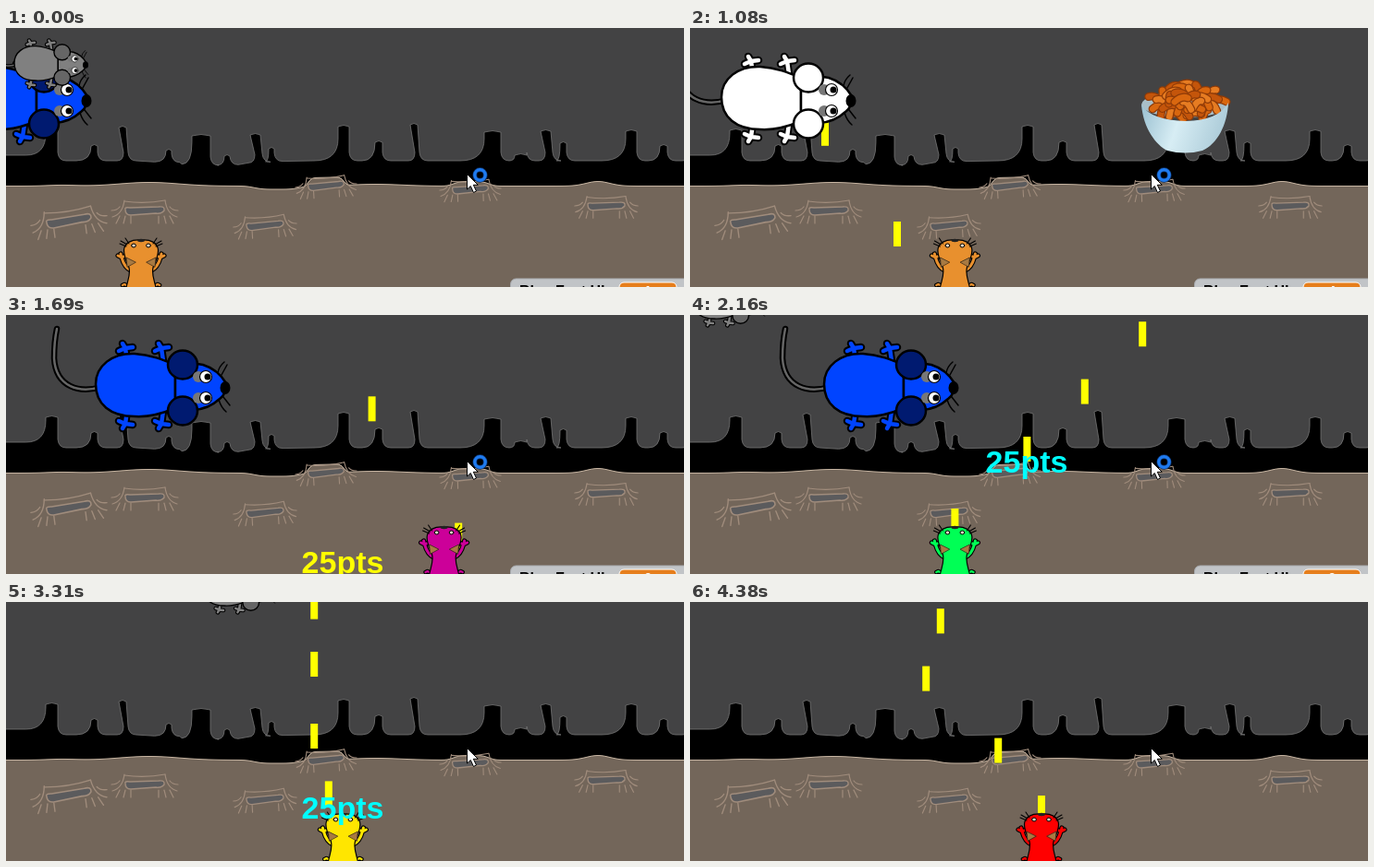
An HTML page with a canvas for the animation above (4460 ms loop, 733 by 281 pixels).

```html
<!DOCTYPE html>
<html lang="en">
<head>
<meta charset="utf-8">
<title>Cave mice</title>
<style>
html, body { margin: 0; width: 100%; height: 100%; overflow: hidden; background: #000; }
canvas { display: block; }
</style>
</head>
<body>
<canvas id="stage" width="733" height="281"></canvas>
<script>
const ctx = document.getElementById('stage').getContext('2d');
const LOOP = 4460, STEPS = 58, UNIT = 15.6, TICKS = 7 / 3;
const FONT = '"Liberation Sans", Arial, sans-serif';

function shape(d, fill, stroke, width = 1) {
  const path = typeof d === 'string' ? new Path2D(d) : d;
  if (fill) { ctx.fillStyle = fill; ctx.fill(path); }
  if (stroke) { ctx.strokeStyle = stroke; ctx.lineWidth = width; ctx.stroke(path); }
}

function oval(x, y, rx, ry, fill, stroke, width) {
  const path = new Path2D();
  path.ellipse(x, y, rx, ry, 0, 0, Math.PI * 2);
  shape(path, fill, stroke, width);
}

function panel(x, y, w, h, r, fill, stroke) {
  const path = new Path2D();
  path.roundRect(x, y, w, h, r);
  shape(path, fill, stroke);
}

function limb(d, color, width, edge = 2) {
  shape(d, null, '#000', width + edge * 2);
  shape(d, null, color, width);
}

function placed(x, y, scale, draw) {
  ctx.save();
  ctx.translate(x, y);
  ctx.scale(scale, scale);
  ctx.lineCap = ctx.lineJoin = 'round';
  draw();
  ctx.restore();
}

// Draws the right half, then its mirror image
function mirrored(draw) {
  for (const side of [1, -1]) {
    ctx.save();
    ctx.scale(side, 1);
    draw();
    ctx.restore();
  }
}

function label(text, x, y, size, color, align = 'center') {
  ctx.font = `bold ${size}px ${FONT}`;
  ctx.textAlign = align;
  ctx.fillStyle = color;
  ctx.fillText(text, x, y);
}

// Linear interpolation through [step, value] pairs
function at(keys, s) {
  let i = 1;
  while (i < keys.length - 1 && s > keys[i][0]) i++;
  const [a, u] = keys[i - 1], [b, v] = keys[i];
  return u + (v - u) * (s - a) / (b - a);
}

const bump = (x, center, width, power = 2) => Math.exp(-Math.pow(Math.abs(x - center) / width, power));

// Notches in the cave roof: left edge, width, top
const notches = [[43, 13, 111], [92, 7, 128], [122, 8, 108], [173, 6, 133], [201, 20, 117],
  [236, 6, 139], [264, 11, 116], [284, 6, 131], [359, 12, 107], [399, 8, 124], [437, 8, 105],
  [517, 18, 113], [550, 13, 138], [578, 11, 112], [599, 7, 125], [670, 12, 112], [707, 8, 128], [745, 9, 130]];

function roofPath() {
  let d = 'M-3,-3V138', right = 0;
  for (const [x, w, top] of notches) {
    const low = x < 50 ? 138 : 144 + 5 * bump(x, 225, 45);
    const lean = w < 12 && top < 120 ? 5 : 0, foot = x + lean;
    const r = Math.min((foot - right) / 2, lean ? 7 : 26, low - top);
    d += `L${foot - r},${low}Q${foot},${low} ${foot},${lean ? low - 9 : Math.max(top, low - 24)}L${x},${top}` +
      `Q${x + w / 2},${top - 3} ${x + w},${top}`;
    right = x + w + lean * 0.4;
    const floor = 144 + 5 * bump(right, 225, 45);
    d += `L${right},${floor - 9}Q${right + 1},${floor} ${right + 9},${floor}`;
  }
  return d + 'V-3Z';
}

function groundPath() {
  let d = 'M-3,285';
  for (let x = -3; x < 738; x += 3) {
    const y = 171.5 - 4 * bump(x, 155, 45) - bump(x, 60, 22) + 3.5 * bump(x, 293, 27, 4)
      - 9 * bump(x, 346, 20, 8) - 2 * bump(x, 400, 40) - 5 * bump(x, 503, 21, 4) - 5 * bump(x, 640, 18);
    d += `L${x},${y}`;
  }
  return d + 'V285Z';
}

const roof = new Path2D(roofPath());
const ground = new Path2D(groundPath());
const craters = [[68, 209, 1.15, -0.13], [150, 198, 1, 0], [280, 214, 0.95, -0.06],
  [346, 171, 0.92, -0.06], [502, 175, 0.92, -0.03], [649, 193, 0.95, 0]];

function crater([x, y, scale, tilt]) {
  placed(x, y, scale, () => {
    ctx.rotate(tilt);
    const rim = '#a08c7c';
    shape('M-21,-1Q-22,-4 -16,-3L15,-4Q22,-5 21,0Q18,4 12,3L-15,5Q-21,5 -21,-1Z', '#5b5b5d', rim, 1.4);
    shape('M-22,-10Q0,-7 22,-11', null, rim, 1.2);
    mirrored(() => {
      shape('M22,-11Q24,4 35,7M27,-4Q30,0 36,0', null, rim, 1.2);
      for (let i = 0; i < 3; i++) shape(`M${27 - i * 6},6q${2 - i},4 ${4 - i * 2},8`, null, rim, 1.2);
    });
  });
}

function scenery() {
  ctx.fillStyle = '#000';
  ctx.fillRect(0, 0, 733, 281);
  shape(roof, '#434344', '#777', 0.8);
  shape(ground, '#73665a', '#c8b6a3', 1);
  craters.forEach(crater);
}

// Mouse facing right, placed by its nose
function mouse(x, y, scale, body, ear) {
  placed(x, y, scale, () => {
    limb('M-134,-1C-157,6 -183,0 -185,-32Q-185,-50 -182,-64', '#666', 2.5);
    for (const fx of [-108, -69]) {
      for (const dir of [-1, 1]) {
        const fy = -2 + dir * 41;
        limb(`M${fx + 2},${fy - dir * 14}L${fx},${fy}l-7,${dir * -3}M${fx},${fy}l-3,${dir * 5}M${fx},${fy}l8,${dir}`, body, 4.5);
      }
    }
    shape('M-140,-4C-140,-24 -122,-38 -98,-37C-80,-36 -66,-30 -54,-25L-54,22C-68,28 -82,32 -98,31C-124,31 -140,18 -140,-4Z',
      body, '#000', 2.5);
    shape('M-4,-14L2,-25M-8,-16Q-7,-23 -1,-28M-2,10L5,19M-7,13Q-4,22 1,26', null, '#000', 1.5);
    shape('M-54,-18Q-42,-29 -24,-25Q-8,-20 1,-5Q2,6 -6,12Q-18,23 -34,24Q-50,23 -54,10Z', body, '#000', 2.5);
    for (const side of [-1, 1]) {
      oval(-46, side * 25, 16, 15.5, ear, '#000', 2.5);
      const ey = -0.5 + side * 11.5;
      oval(-29, ey, 6, 6, '#777');
      oval(-21, ey, 6.5, 6.5, '#fff', '#000', 1.2);
      oval(-19, ey, 3.5, 3.5, '#000');
    }
    oval(0, 0, 5.5, 7, '#000');
  });
}

function hero(x, color) {
  placed(x, 0, 1, () => {
    mirrored(() => {
      limb('M11,263Q18,260 21,249l-4,-2M21,249l1,-4M21,249l4,-2', color, 3, 1.1);
      limb('M14,280L18,278l2,1', color, 2.5, 1.1);
    });
    shape('M0,230C10,229 18,233 18.5,241C18.5,250 14,255 13,260C11,268 15,275 16.5,284L-16.5,284' +
      'C-15,275 -11,268 -13,260C-14,255 -18.5,250 -18.5,241C-18,233 -10,229 0,230Z', color, '#000', 1.2);
    mirrored(() => {
      shape('M6,254L16,249L15,259Z', '#a87a42', '#3a2c1c', 0.8);
      oval(8, 236, 2.4, 2, '#d8d0c0', '#000', 1);
      shape('M13,234L17,228M15,235L22,231M16,237L23,234', null, '#000', 1.1);
    });
    oval(0, 230.5, 4, 1.7, color === 'white' ? '#d81660' : '#222');
  });
}

function bowl(x, y) {
  placed(x, y, 1, () => {
    oval(1, -12, 47, 14, '#a9bfc8');
    const count = 34;
    for (let i = 0; i < count; i++) {
      const a = i * 2.4, r = Math.sqrt((count - i) / count);
      const px = 2 + Math.cos(a) * r * 36, py = -15 + Math.sin(a) * r * 18;
      const dx = Math.cos(i * 1.7) * 8, dy = Math.sin(i * 1.7) * 5;
      const d = `M${px - dx},${py - dy}Q${px},${py - 5} ${px + dx},${py + dy}`;
      shape(d, null, '#8f3b08', 9);
      shape(d, null, ['#d9670f', '#c4550b', '#e67c22'][i % 3], 6.5);
    }
    const cup = ctx.createLinearGradient(-46, 0, 48, 30);
    cup.addColorStop(0, '#9fc4d4');
    cup.addColorStop(0.4, '#d7edf4');
    cup.addColorStop(1, '#a5c6d4');
    shape('M-46,-12C-44,14 -30,32 -18,38Q1,43 20,38C36,31 47,10 48,-14Q38,5 2,6Q-36,5 -46,-12Z', cup);
  });
}

const colors = ['#e8902e', '#2f62ff', '#cc0099', '#ffe600', '#00e5ff', '#b04cff', '#ff8a00', '#f00', '#00ff55', 'white'];
const flashes = ['#f0f', '#0f0', '#ff0', '#0ff', '#f00'];

// The hero's column over time, where it turns
const heroPath = [[0, 0], [11, 0], [13.7, 5], [14, 9], [22, 21], [22.5, 22], [28, 9], [30, 9],
  [33, 12], [41, 12], [46, 16], [48, 13], [49, 10], [53, 7], [57, 15]];
const heroColumn = s => Math.round(at(heroPath, s));
const columnX = k => 146 + UNIT * k;

// Bursts of fire: first tick, number of shots
const bursts = [[3, 2], [25, 1], [32, 1], [43.2, 1], [52, 5], [82, 13]];

function shots(tick) {
  ctx.fillStyle = '#ff0';
  for (const [first, count] of bursts) {
    for (let i = 0; i < count; i++) {
      const start = first + Math.round(i * 4.25 - 0.1);
      const k = heroColumn(start / TICKS);
      const y = 223.5 - UNIT * (tick - start);
      const end = start < 75 && k <= 9 ? 75 : -10; // stopped by the big mouse
      if (tick >= start - 1 && y > end) ctx.fillRect(columnX(k) - 4, y - 13.5, 8, 27);
    }
  }
}

const points = (s, y) => label('25pts', 364, y + 11, 34, flashes[s % 5]);

function board(s) {
  panel(545.5, 272, 200, 40, 6, '#c1c4c7', '#a9adb1');
  label('Blue Fast HI', 555, 291, 16, '#000', 'left');
  panel(663, 276, 62, 30, 5, '#e67e1c', '#fff');
  label(s < 4 ? '1' : s < 21 ? '4' : s < 32 ? '6' : '8', 694, 290, 15, '#fff');
}

function busyRing() {
  oval(512.5, 159.5, 5.7, 5.7, null, '#0b2a5c', 5);
  oval(512.5, 159.5, 5.7, 5.7, null, '#1f7bef', 3.4);
}

function draw() {
  const t = performance.now() % LOOP;
  let s = Math.min(STEPS - 1, Math.floor((t + 4) * STEPS / LOOP));
  if (s === 29) s = 28; // short stall

  scenery();
  shots(Math.floor(s * TICKS));

  if (s < 32) {
    const hit = s === 13 || s === 14;
    const nose = at([[0, 87], [14, 174], [22, 237], [28, 285]], s);
    mouse(nose, 79, 1, hit ? '#fff' : '#0044ff', hit ? '#fff' : '#001a70');
  }
  if (s < 4) mouse(86 + 14 * s, 40, 0.55, '#808080', '#666');
  if (s > 22 && s < 46) mouse(80 + 14 * (s - 28), -13, 0.55, '#808080', '#666');
  if (s > 6 && s < 21) bowl(534 - 4.7 * (s - 14), 95 + 16 * (s - 14));

  hero(columnX(heroColumn(s)), colors[s < 21 ? 0 : s % 10]);
  if (s > 21 && s < 39) points(s, at([[22, 269], [28, 160], [37, 8]], s));
  if (s > 38) points(s, 116 - 18 * (s - 49));
  if (s < 37) {
    board(s);
    busyRing();
  }
  shape('M498.5,158.5V175L502.3,171.5L505.5,178.5L508.5,177L505.3,170.3H510.3Z', '#fff', '#000');
  requestAnimationFrame(draw);
}
draw();
</script>
</body>
</html>
```
